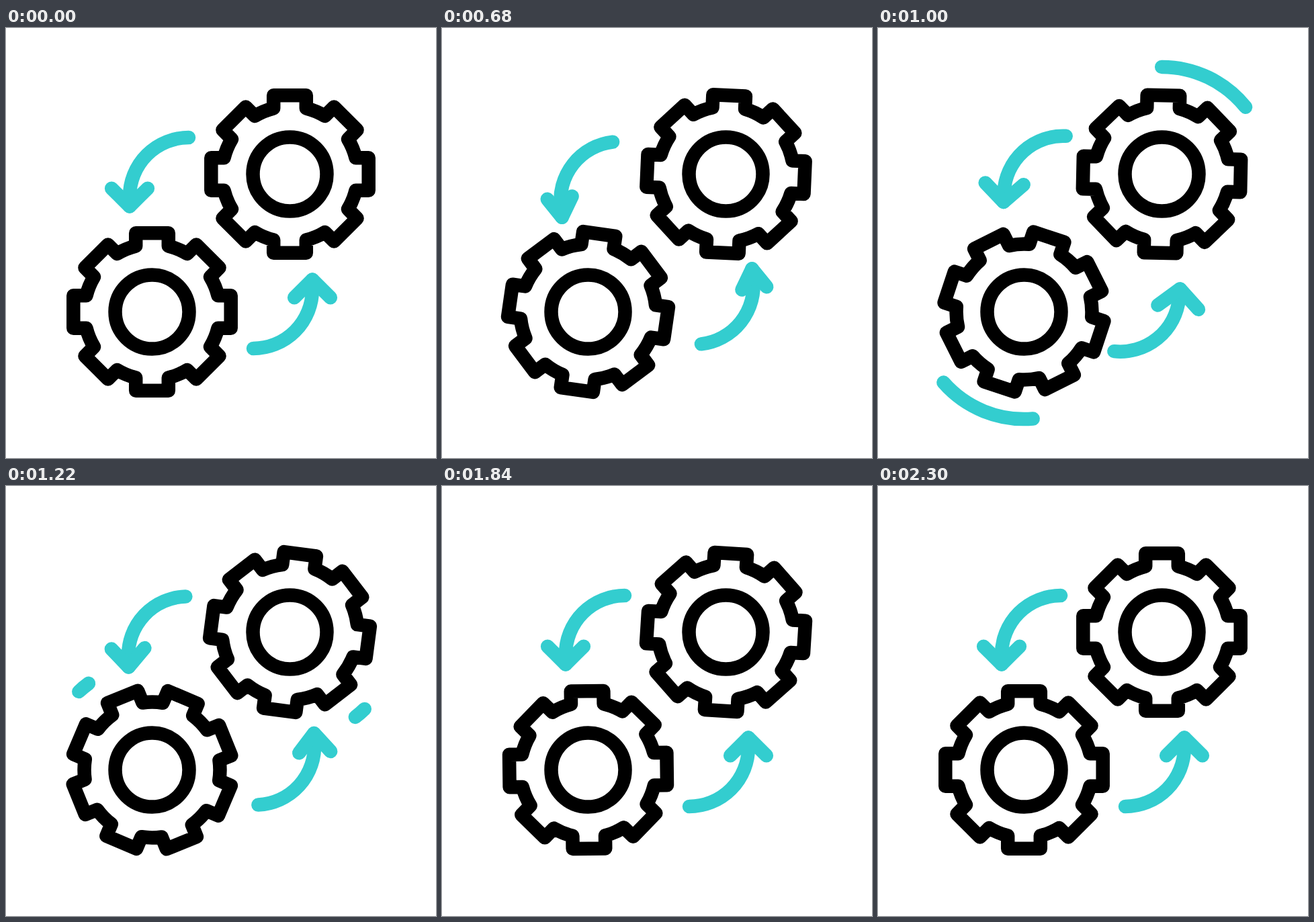
These frames come from a looping animation (640x640 px, 2600 ms). An HTML page:

```html
<!DOCTYPE html>
<html lang="en">
<head>
<meta charset="utf-8">
<title>Turning gears</title>
<style>
  html, body { margin: 0; width: 100%; height: 100%; overflow: hidden; background: #fff; }
  svg { display: block; width: 100vw; height: 100vh; }
  path, circle { fill: none; stroke-width: 20.5; stroke-linecap: round; stroke-linejoin: round; }
  .gear { stroke: #000; }
  .accent { stroke: #33cdcf; }
</style>
</head>
<body>
<svg id="stage" viewBox="0 0 640 640"></svg>
<script>
const LOOP = 2600, STEP = 20;
const LEAD = 30; // the lower gear and arrow run this far ahead, in ms
const stage = document.getElementById('stage');

function add(parent, tag, attrs) {
  const el = document.createElementNS('http://www.w3.org/2000/svg', tag);
  for (const name in attrs) el.setAttribute(name, attrs[name]);
  return parent.appendChild(el);
}

// Point on a circle, angle in degrees clockwise from the top.
function polar(cx, cy, r, deg) {
  const a = deg * Math.PI / 180;
  return `${(cx + r * Math.sin(a)).toFixed(2)} ${(cy - r * Math.cos(a)).toFixed(2)}`;
}

const clamp = x => Math.min(1, Math.max(0, x));
const smooth = x => x * x * (3 - 2 * x);

// Smooth curve through [time, value] keys, flat at peaks and at both ends.
function curve(keys) {
  const rate = i => (keys[i + 1][1] - keys[i][1]) / (keys[i + 1][0] - keys[i][0]);
  const slopes = keys.map((key, i) => {
    if (i === 0 || i === keys.length - 1) return 0;
    const a = rate(i - 1), b = rate(i);
    return a * b > 0 ? 2 * a * b / (a + b) : 0;
  });
  return t => {
    if (t <= keys[0][0]) return keys[0][1];
    for (let i = 0; i < keys.length - 1; i++) {
      const [t0, v0] = keys[i], [t1, v1] = keys[i + 1];
      if (t > t1) continue;
      const d = t1 - t0, u = (t - t0) / d, s = smooth(u);
      return v0 + (v1 - v0) * s
        + d * u * (1 - u) * ((1 - u) * slopes[i] - u * slopes[i + 1]);
    }
    return keys[keys.length - 1][1];
  };
}

// One full turn: wind back, spin, overshoot and settle.
const turn = curve([[140, 0], [495, -10], [680, 2.5], [710, 8.2], [1000, 136.2],
  [1030, 153.3], [1220, 277.5], [1250, 293], [1540, 361.7], [1570, 365.6],
  [1665, 371], [1840, 363.6], [1870, 359.3], [1980, 354], [2300, 360]]);

// Fading swing of the arrows.
const swing = curve([[160, 0], [695, -6.7], [1000, 2.8], [1030, 6], [1075, 8],
  [1220, -1.7], [1250, -2.7], [1300, -3.3], [1480, 0]]);

// Eight square teeth joined by arcs.
function gearPath() {
  const half = 24.3, top = 117.2, root = 98;
  const valley = Math.hypot(half, root), crown = Math.hypot(half, top);
  const rootAngle = Math.atan2(half, root) * 180 / Math.PI;
  const topAngle = Math.atan2(half, top) * 180 / Math.PI;
  let d = '';
  for (let a = 0; a < 360; a += 45) {
    const start = polar(0, 0, valley, a - rootAngle);
    d += (a ? `A${valley} ${valley} 0 0 1 ` : 'M') + start
      + 'L' + polar(0, 0, crown, a - topAngle)
      + 'L' + polar(0, 0, crown, a + topAngle)
      + 'L' + polar(0, 0, valley, a + rootAngle);
  }
  return d + `A${valley} ${valley} 0 0 1 ${polar(0, 0, valley, -rootAngle)}Z`;
}

function makeGear(cx, cy, lead) {
  const group = add(stage, 'g', { class: 'gear', transform: `translate(${cx} ${cy})` });
  const teeth = add(group, 'path', { d: gearPath() });
  add(group, 'circle', { r: 55 });
  return t => teeth.setAttribute('transform', `rotate(${turn(t ? t + lead : 0)})`);
}

// Swings about the stage centre; the head folds and opens with the swing.
function makeArrow(base, lead) {
  const group = add(stage, 'g', { class: 'accent' });
  add(group, 'path', { d: 'M272 163A88 88 0 0 0 184 251V265.5' });
  const head = add(group, 'path', {});
  return t => {
    const r = swing(t ? t + lead : 0);
    const open = 45 + r * (r < 0 ? 1.9 : 0.5);
    const size = 38 + r * 0.5;
    head.setAttribute('d', 'M' + polar(184, 265.5, size, -open)
      + 'L184 265.5L' + polar(184, 265.5, size, open));
    group.setAttribute('transform', `rotate(${base + r} 320 320)`);
  };
}

// An arc sweeping clockwise round a gear, its tail following its head.
function makeSweep(cx, cy, from, to) {
  const r = 159.6, span = 396;
  const path = add(stage, 'path', { class: 'accent' });
  return t => {
    const head = smooth(clamp((t - 795) / span));
    const tail = smooth(clamp((t - 868) / span));
    const shown = head > 0 && tail < 1;
    path.setAttribute('visibility', shown ? 'visible' : 'hidden');
    if (!shown) return;
    const a = from + (to - from) * tail, b = from + (to - from) * head;
    path.setAttribute('d', 'M' + polar(cx, cy, r, a)
      + `A${r} ${r} 0 ${b - a > 180 ? 1 : 0} 1 ` + polar(cx, cy, r, b));
  };
}

const parts = [
  makeGear(422.5, 217.5, 0),
  makeGear(217.5, 422.5, LEAD),
  makeArrow(0, 0),
  makeArrow(180, LEAD),
  makeSweep(422.5, 217.5, -50, 142.4),
  makeSweep(217.5, 422.5, 123.3, 323.7)
];

const begin = performance.now();
function draw(now) {
  const time = Math.max(0, now - begin) % LOOP;
  const t = time < 160 ? 0 : Math.floor(time / STEP) * STEP;
  for (const part of parts) part(t);
  requestAnimationFrame(draw);
}
draw(begin);
</script>
</body>
</html>
```
